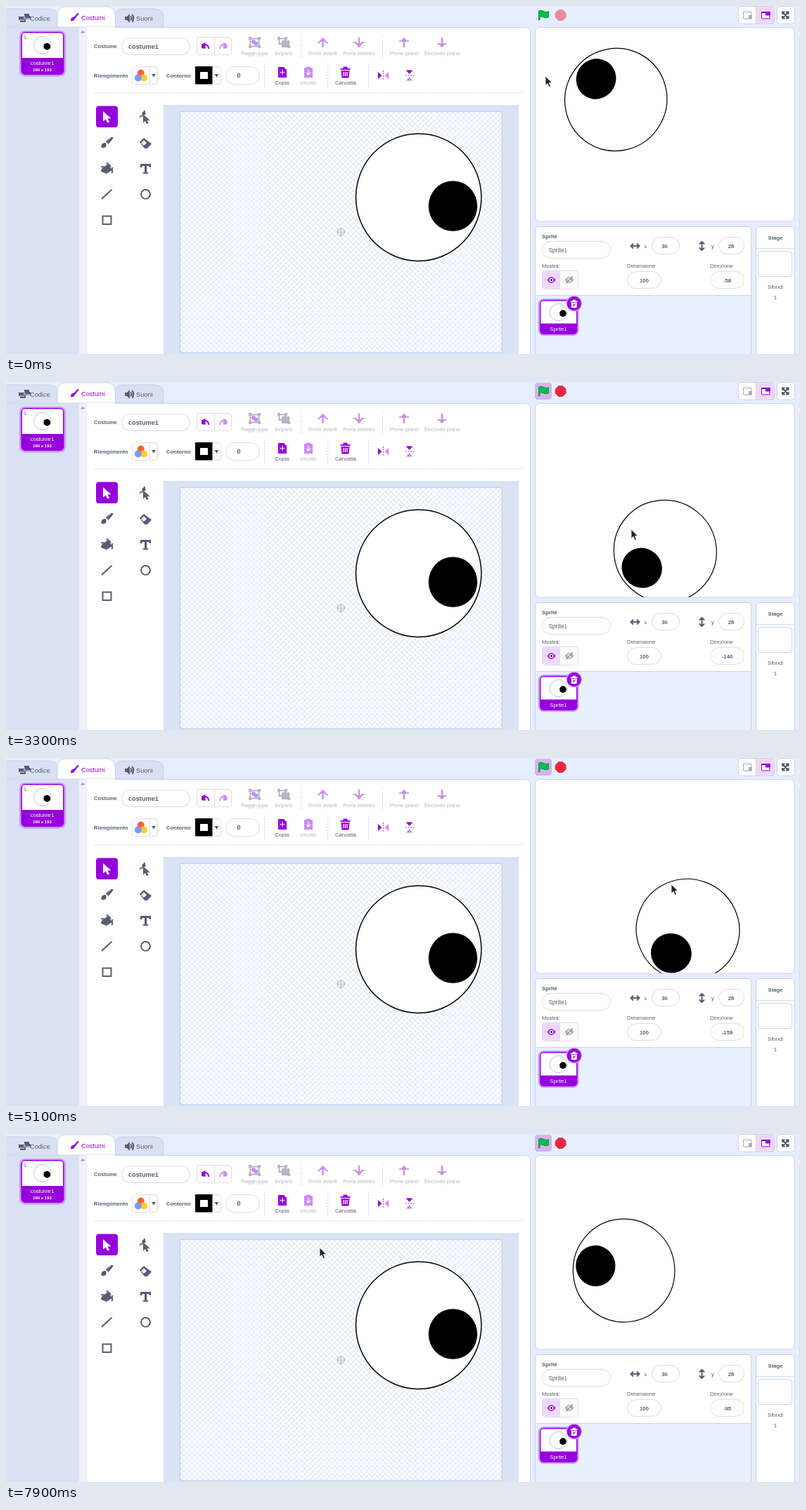
Write an HTML page that moves like this. It is 1129 px wide and 496 px high and loops after 8000 ms.

```html
<!DOCTYPE html>
<html lang="it">
<head>
<meta charset="utf-8">
<title>Occhio</title>
<style>
html, body { margin: 0; width: 100%; height: 100%; overflow: hidden; background: #e6eefe }
svg { display: block; width: 100%; height: 100%; font: 7.7px "Liberation Sans", Arial, sans-serif; fill: #575e75 }
.panel { fill: #fff; stroke: #c9d3e8 }
.field { fill: #fff; stroke: #dcdce6 }
.b { font-weight: bold }
.tab { font-size: 9.2px }
.mid { text-anchor: middle }
.off { opacity: .45 }
.p { fill: #9600dc }
.w { fill: #fff }
.line { fill: none; stroke: #575e75; stroke-width: 2 }
.pl { fill: none; stroke: #9600dc; stroke-width: 2 }
.wl { fill: none; stroke: #fff; stroke-width: 1.2 }
.dash { fill: none; stroke: #d2d5dd; stroke-dasharray: 2 2 }
</style>
</head>
<body>
<svg viewBox="0 0 1129 496" preserveAspectRatio="none">
<defs>
  <pattern id="checks" x="247.5" y="150.5" width="7.64" height="7.64" patternUnits="userSpaceOnUse">
    <path class="w" d="M0 0H7.64V7.64H0z"/>
    <path fill="#e7eefc" d="M3.82 0H7.64V3.82H0V7.64H3.82z"/>
  </pattern>
  <clipPath id="stageClip"><rect x="753" y="31" width="367.5" height="275.5" rx="5"/></clipPath>
  <g id="eye">
    <ellipse cx="110.5" cy="-49.3" rx="89.2" ry="90.7" fill="#fff" stroke="#000" stroke-width="1.5"/>
    <ellipse cx="159.3" cy="-36.8" rx="34.7" ry="35.9" fill="#000"/>
  </g>
  <g id="miniEye">
    <circle r="12.3" fill="#fff" stroke="#aaa" stroke-width=".7"/>
    <circle cx="6.4" cy="1.6" r="4.9" fill="#000"/>
  </g>
  <path id="arrow" d="M-1.2 14V6H-5.5L0-.5 5.5 6H1.2V14z"/>
  <path id="pointer" d="M-6-8V6.5L-2.3 3.4.2 8.5 3 7.2.6 2.3H5.5z"/>
  <path id="caret" d="M-3-2H3L0 2.5z"/>
  <g id="bin"><path d="M-7-5.5H-3V-8H3V-5.5H7V-3.5H-7z"/><path d="M-6-2.5H6L5 8H-5z"/></g>
</defs>

<!-- tabs and costume list -->
<g stroke="#c7d1e8">
  <path fill="#d9e1f2" d="M-1 30V4H60Q74 4 74 17V30zM155 30V17Q155 4 168 4H211Q224 4 224 17V30z"/>
  <path class="w" d="M73 30V14Q73 1 86 1H142Q155.500 1 155.500 14V30z"/>
</g>
<path class="w" d="M115 30H737Q745.500 30 745.500 38V496H115z"/>
<path fill="none" stroke="#c9d3e8" d="M155 30.500H737Q745.500 30.500 745.500 38V496"/>
<path fill="#d9e1f2" d="M0 30.500H104V496H0z"/>
<path fill="#eff2f8" d="M104 30.500H115.500V496H104z"/>
<path fill="#999" d="M106 38.500H112L109 35z"/>
<path d="M19 15H26V11H33V14H35V19H28V23H20V20H18V15z"/>
<path stroke="#d9e1f2" d="M26 14V18H34M20 20H26"/>
<g class="tab"><text x="34" y="21">Codice</text><text class="p" x="107" y="19.500">Costumi</text><text x="185" y="21">Suoni</text></g>
<path class="p" d="M92 21Q92 16 96 16L102 10Q104 9 103 12L98 18Q97 22 92 21z"/>
<path d="M169 15H172L176 11V24L172 20H169z"/>
<path class="line" stroke-width="1" d="M177.500 14.500Q179.500 17.500 177.500 20.500M179.500 12Q183 17.500 179.500 23"/>
<rect x="19" y="35" width="66" height="65.500" rx="8" fill="#cd9bf2"/>
<rect class="p" x="21.500" y="37" width="61" height="61" rx="6"/>
<path class="w" d="M23 74V42Q23 38.500 27 38.500H77Q81 38.500 81 42V74z"/>
<text x="25" y="47">1</text>
<use href="#miniEye" x="51.800" y="56"/>
<g class="w mid"><text x="51.500" y="83.500">costume1</text><text class="b" x="51.500" y="92.500" font-size="6">190 x 193</text></g>

<!-- paint toolbar -->
<g class="b"><text x="125" y="60">Costume</text><text x="125" y="102">Riempimento</text><text x="228" y="102">Contorno</text></g>
<g class="field">
  <rect x="164.500" y="45.500" width="97" height="24" rx="12"/>
  <rect x="271.500" y="44.500" width="49" height="25" rx="4"/>
  <rect x="179.500" y="86.500" width="36" height="25" rx="4"/>
  <rect x="269.500" y="86.500" width="36" height="25" rx="4"/>
  <rect x="312.500" y="86.500" width="48" height="25" rx="12.500"/>
  <path d="M296.500 45V69M204.500 87V111"/>
</g>
<g class="b tab"><text x="174" y="60.500">costume1</text><text class="mid" x="331" y="102">0</text></g>
<g id="undo"><path class="pl" d="M281 56Q287 53 288.500 61"/><path class="p" d="M278 54.500L283.500 52V61L278 60z"/></g>
<use href="#undo" class="off" transform="matrix(-1 0 0 1 592.500 0)"/>
<circle cx="191.800" cy="95.500" r="5" fill="#ff6038"/><circle cx="196" cy="102.500" r="5" fill="#ffc832"/><circle cx="187.800" cy="102.500" r="5" fill="#6d8dff" opacity=".9"/>
<use href="#caret" x="210" y="99"/><use href="#caret" x="299.500" y="99"/>
<path d="M269 86H293.500V111.500H269z" fill="#000"/><path class="w" d="M276 94H287V104H276z"/>
<path class="dash" d="M125 124H737M419.500 40V75M535.500 40V75M367.500 82V117M457.500 82V117M515.500 82V117"/>
<g class="off">
  <g class="mid"><text x="353" y="69.500">Raggruppa</text><text x="394.500" y="69.500">Separa</text><text x="450.500" y="69.500">Porta avanti</text><text x="502" y="69.500">Porta indietro</text><text x="566" y="69.500">Primo piano</text><text x="620" y="69.500">Secondo piano</text><text x="429.500" y="111.500">Incolla</text></g>
  <g class="p"><use href="#arrow" x="450.500" y="45"/><use href="#arrow" transform="matrix(1 0 0 -1 502 59)"/><use href="#arrow" x="566" y="45"/><use href="#arrow" transform="matrix(1 0 0 -1 620 59)"/></g>
  <path class="line" d="M443 52H447M454 52H458M494 52H499M505 52H510M559 50H563M569 50H573M613 54H617M623 54H627"/>
  <path class="line" stroke-width="1" d="M347.500 46.500H359.500V57.500H347.500zM388.500 46.500H397V54H388.500zM393 50H402V58H393z"/>
  <path d="M345 44H349V48H345zM358 44H362V48H358zM345 56H349V60H345zM358 56H362V60H358zM386 44H390V48H386zM396 44H400V48H396zM394 51H401V57H394zM400 56H404V60H400z"/>
  <circle class="p" cx="352" cy="51" r="3"/><path class="p" d="M353 51H358V56H353z"/>
  <path class="p" d="M424 88H427V86.500H433V88H436V102H424z"/><path class="wl" d="M430 91V98M427 95L430 98 433 95"/>
</g>
<g class="mid"><text x="392.500" y="111.500">Copia</text><text x="483" y="111.500">Cancella</text></g>
<path class="p" d="M387 87H395L399 91V102H387z"/><path class="wl" d="M393 91V98M389.500 94.500H396.500"/>
<use href="#bin" class="p" x="482.500" y="94.500"/><path class="wl" d="M480 94V100M482.500 94V100M485 94V100"/>
<g id="flip"><path class="p" d="M529 94L534.500 99 529 104z"/><path class="p off" d="M544 94L538.500 99 544 104z"/><path fill="none" stroke="#575e75" stroke-dasharray="2 1.500" d="M536.500 92V106"/></g>
<use href="#flip" transform="rotate(90 555 117.500)"/>

<!-- tools -->
<rect class="p" x="128" y="142.500" width="31" height="30.500" rx="4"/>
<use href="#pointer" class="w" x="144" y="158"/>
<use href="#pointer" transform="translate(200 161) scale(.85)"/><path class="line" stroke-width="1.500" d="M190 158Q196 157 197 149"/><circle cx="196" cy="153" r="2.500"/>
<path d="M135 201Q136 194 142 195Q144 201 139 202.500zM142 193L150 187Q153 186 152 189L145.500 197z"/>
<path d="M190 194L196 188 207 196.500 201 203H197z"/><path class="w" d="M192 195L196 191.500 200 195 196 199z"/>
<path d="M136 232L145 225 151 234 143 239 135 236z"/><path class="line" stroke-width="1.500" d="M143 223L149 229M135 229L144 230M151 230V238"/>
<path d="M191 225H206V230H204L203 228H200.200V237H202V239H195V237H197V228H194L193 230H191z"/>
<path class="line" d="M136 275L150.500 261.500"/><circle class="line" cx="198.500" cy="268.300" r="6.500"/><path class="line" d="M137.500 299.500H149.500V311H137.500z"/>

<!-- drawing area -->
<path fill="#d9e3f4" d="M224 141H729V496H224z"/>
<rect x="247.500" y="150.500" width="457.500" height="343.500" fill="url(#checks)" stroke="#b9cbec"/>
<g fill="none" stroke="#c3c6ce" stroke-width="1.500"><circle cx="476.300" cy="322.300" r="5"/><path d="M469.500 322.300H483M476.300 315.500V329"/></g>
<use href="#eye" x="476.200" y="322"/>
<ellipse id="outline" cx="586.700" cy="272.700" rx="89.200" ry="90.700" fill="none" stroke="#12649f" stroke-width="1.500"/>

<!-- stage header -->
<rect id="flagGlow" x="752" y="1" width="24" height="24" rx="4" fill="#d5b2f3"/>
<path fill="#00bd4c" stroke="#1b8d45" d="M757.500 20V7Q761 5 764.500 7.500T771.500 7.500V16Q768 18 764.500 16T759 16V20z"/>
<path id="stop" fill="#f0263f" stroke="#cc2c42" d="M785.500 5.800H791.700L796 10.200V16.200L791.700 20.500H785.500L781.200 16.200V10.200z"/>
<path class="panel" d="M1066.500 .5H1045Q1041.500 .5 1041.500 4V22Q1041.500 25.500 1045 25.500H1066.500z"/>
<path fill="#efd9fb" stroke="#d8cce8" d="M1066.500 .5H1089Q1092.500 .5 1092.500 4V22Q1092.500 25.500 1089 25.500H1066.500z"/>
<rect class="panel" x="1096.500" y=".5" width="25" height="25" rx="4"/>
<path fill="#fff" stroke="#a5a9b7" d="M1048.500 8.500H1060V18H1048.500z"/><path fill="#a5a9b7" d="M1056 13H1060.500V18.500H1056z"/>
<path class="w" stroke="#9600dc" d="M1074.500 8.500H1086V18H1074.500z"/><path class="p" d="M1080 8H1086.500V13.500H1080zM1074 8H1080V10H1074z"/>
<path class="line" stroke-width="1.500" d="M1104 12V8.500H1107.500M1109 8.500H1112.500V12M1104 14V17.500H1107.500M1109 17.500H1112.500V14M1104 8.500L1112.500 17.500M1112.500 8.500L1104 17.500"/>

<!-- stage and sprite panels -->
<rect class="panel" x="752.500" y="30.500" width="368.500" height="276.500" rx="6"/>
<g clip-path="url(#stageClip)"><use href="#eye" id="sprite"/></g>
<path fill="#e8effd" stroke="#c9d3e8" d="M752.500 496V320Q752.500 314.500 758 314.500H1054Q1059.500 314.500 1059.500 320V496"/>
<path class="panel" d="M752.500 412.500V320Q752.500 314.500 758 314.500H1054Q1059.500 314.500 1059.500 320V412.500z"/>
<path class="panel" d="M1066.500 497V320Q1066.500 314.500 1072 314.500H1115Q1121 314.500 1121 320V497z"/>
<path stroke="#d3dbea" d="M1067 345.500H1120.500M1128.500 45V496"/>
<g class="field">
  <rect x="762.500" y="335.500" width="97" height="24" rx="12"/><rect x="918.500" y="329.500" width="39" height="24" rx="12"/><rect x="1013.500" y="329.500" width="36" height="24" rx="12"/>
  <rect x="883.500" y="378.500" width="48" height="24" rx="12"/><rect x="1001.500" y="378.500" width="48" height="24" rx="12"/>
  <rect x="762.500" y="377.500" width="51" height="26" rx="4"/><rect x="1069.500" y="349.500" width="48" height="36" rx="4" stroke="#c9d3e8"/>
</g>
<path fill="#efd9fb" d="M763 378H788V403H763z"/>
<g id="view"><path class="p" d="M769.500 390.500Q775.500 382 781.500 390.500Q775.500 399 769.500 390.500z"/><circle class="w" cx="775.500" cy="390.500" r="3"/><circle class="p" cx="775.500" cy="390.500" r="1.700"/></g>
<g opacity=".65"><path d="M795 390.500Q801 382 807 390.500Q801 399 795 390.500z"/><circle class="w" cx="801" cy="390.500" r="3"/><path class="line" stroke-width="1.200" d="M796.500 395L805.500 386"/></g>
<path id="across" class="line" stroke-width="1.500" d="M889 342H900M892 338.500L888.500 342 892 345.500M897 338.500L900.500 342 897 345.500"/>
<use href="#across" transform="rotate(90 942 389.500)"/>
<text x="907.500" y="344.500">x</text><text x="1003" y="344.500">y</text>
<text class="b" x="762" y="330.500">Sprite</text><text x="771.500" y="350.500" font-size="8.400">Sprite1</text>
<text x="762" y="373">Mostra</text><text x="883" y="373">Dimensione</text><text x="1001" y="373">Direzione</text>
<g class="b mid"><text x="936.500" y="344.500">36</text><text x="1031" y="344.500">28</text><text x="907.500" y="393.500">100</text><text id="direction" x="1025.500" y="393.500"></text><text x="1094" y="332.500">Stage</text></g>
<g class="mid"><text x="1094" y="402.500">Sfondi</text><text x="1094" y="418">1</text></g>
<rect x="756.500" y="417" width="58" height="53" rx="8" fill="#cd9bf2"/><rect class="p" x="759" y="419" width="53.500" height="49" rx="6"/>
<path class="w" d="M760.500 452.500V424Q760.500 420.500 764 420.500H807Q811 420.500 811 424V452.500z"/>
<use href="#miniEye" x="785.500" y="436.500"/>
<text class="w mid" x="785.500" y="462.500">Sprite1</text>
<circle cx="807.800" cy="424" r="11.200" fill="#cd9bf2"/><circle class="p" cx="807.800" cy="424" r="10"/>
<use href="#bin" class="w" transform="translate(807.800 424.500) scale(.72)"/><path stroke="#9600dc" d="M806 424.500L809.600 428M809.600 424.500L806 428"/>

<!-- mouse -->
<path id="cursor" fill="#222" stroke="#fff" stroke-width=".8" d="M0 0V13L3 10.400 5.300 15.500 7.500 14.500 5.300 9.600H9.300z"/>
<path id="hand" fill="#222" stroke="#ddd" stroke-width=".6" d="M-1.500 1Q0-1 1.500 1V5Q3 4 4 5.500 6 4.500 7 6.500V10L6 13H-1L-4 8Q-3.500 6-1.500 8z"/>
</svg>
<script>
const el = id => document.getElementById(id);

// time, mouse x, mouse y, unwrapped direction
const keys = [
  [0, 767, 100, -58], [200, 767, 100, -58], [500, 767, 50, -58], [800, 767, 19, -58],
  [1200, 767, 19, -58], [1300, 767, 19, -60], [1500, 767, 19, -60], [1600, 767, 18, -60],
  [1900, 850, 45, -48], [2200, 965, 71, 4], [2400, 1020, 88, 42], [2500, 1030, 94, 51], [3200, 1030, 94, 51],
  [3300, 889, 210, -140], [3500, 882, 160, -105], [3700, 895, 118, -66], [3900, 932, 98, -25], [4100, 976, 112, 16],
  [4400, 1005, 142, 85], [4700, 992, 182, 145], [5000, 958, 186, 190], [5100, 946, 180, 201], [5300, 943, 180, 213],
  [5400, 943, 180, 213], [5700, 800, 218, 246], [6100, 660, 277, 239], [6400, 582, 295, 235], [6600, 582, 295, 235],
  [7000, 520, 235, 247], [7500, 452, 170, 264], [7900, 446, 162, 265], [8000, 446, 162, 265]
];

function poseAt(t) {
  const i = keys.findIndex(k => k[0] > t), a = keys[i - 1], b = keys[i];
  const f = (t - a[0]) / (b[0] - a[0]);
  return a.slice(1).map((v, n) => v + (b[n + 1] - v) * f);
}

function draw(t) {
  const [x, y, dir] = poseAt(t), running = t >= 1300;
  const overFlag = y < 26 && x < 777 && x > 751;
  const overEye = Math.hypot((x - 586.7) / 89.2, (y - 272.7) / 90.7) < 1;
  const show = (id, on) => el(id).style.display = on ? '' : 'none';
  el('sprite').setAttribute('transform', `translate(964.3 147) rotate(${dir - 90}) scale(.81)`);
  el('direction').textContent = Math.round(dir > 180 ? dir - 360 : dir);
  el('stop').setAttribute('opacity', running ? 1 : .5);
  show('flagGlow', running || overFlag);
  show('outline', overEye);
  show('cursor', !overFlag);
  show('hand', overFlag);
  for (const id of ['cursor', 'hand']) el(id).setAttribute('transform', `translate(${x} ${y})`);
}

const start = performance.now();
function tick(now) {
  const t = Math.max(0, now - start) % 8000;
  draw(Math.floor((t + .5) / 100) * 100 % 8000);
  requestAnimationFrame(tick);
}
draw(0);
requestAnimationFrame(tick);
</script>
</body>
</html>
```
